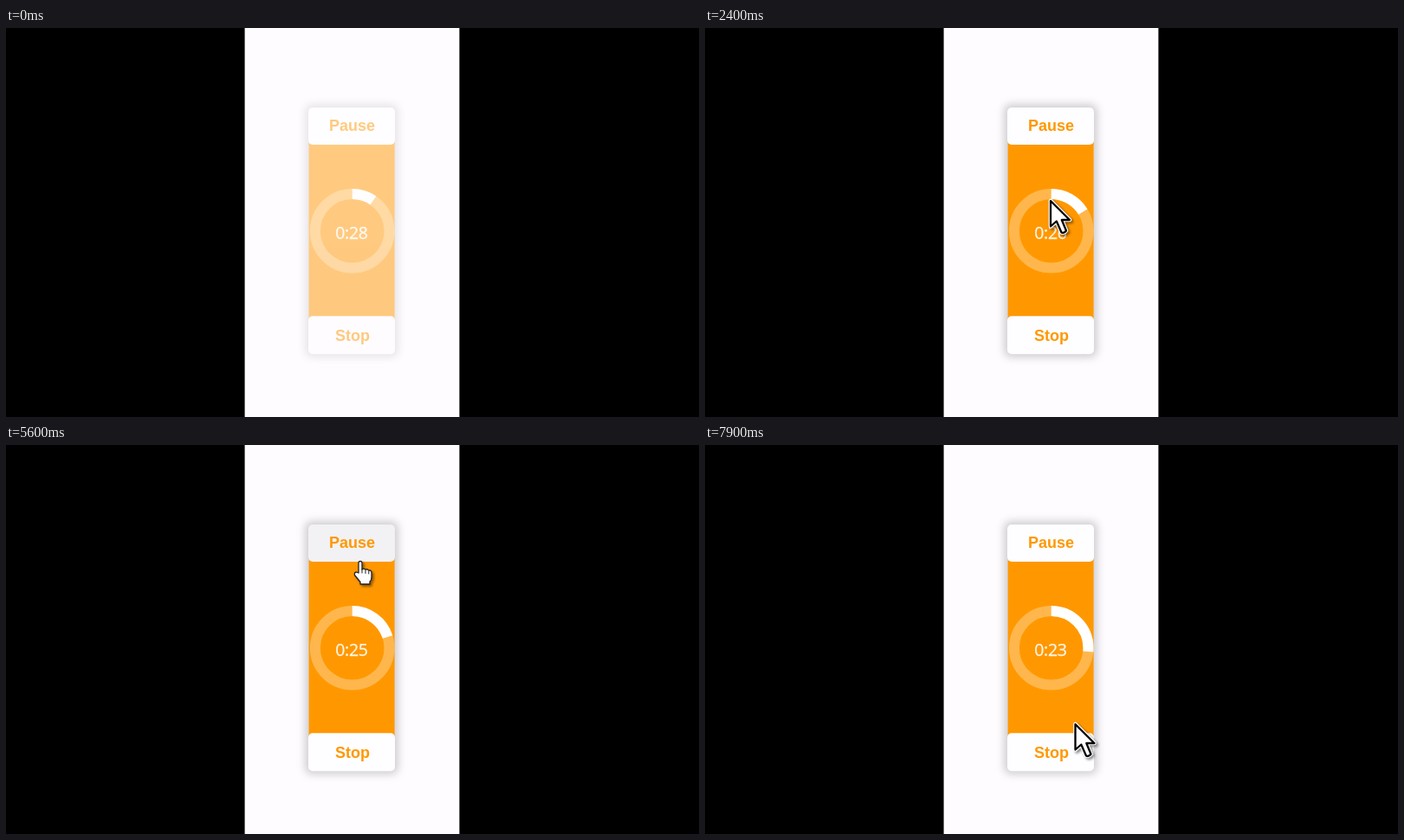
An HTML page that plays this animation: 800x450 px, repeating every 8 s.

```html
<!DOCTYPE html>
<html lang="en">
<head>
<meta charset="utf-8">
<title>Timer widget</title>
<style>
  html, body { margin: 0; width: 100%; height: 100%; overflow: hidden; background: #000; }
  svg { display: block; width: 800px; height: 450px; }
  .label { font: bold 18px "Liberation Sans", Arial, sans-serif; fill: #ff9800; text-anchor: middle; }
  .count { font: 19.5px "Open Sans", "Noto Sans", sans-serif; letter-spacing: -.3px; fill: #fff; fill-opacity: .9; stroke: #fff; stroke-width: .25; text-anchor: middle; }
  .ring { fill: none; stroke: #fff; stroke-width: 12; }
  .button { fill: #fefdff; }
  .button.hover { fill: #f2f1f4; }
  .shadow { filter: drop-shadow(2px 2px 1.5px rgba(0, 0, 0, .45)); }
</style>
</head>
<body>
<svg viewBox="0 0 800 450">
  <defs>
    <clipPath id="screen"><rect x="275.6" width="247.8" height="450"/></clipPath>
    <filter id="blur" x="-30%" y="-30%" width="160%" height="160%"><feGaussianBlur stdDeviation="5"/></filter>
    <path id="arrowShape" d="M0 0V29.5L6.8 23.5L12.5 36.5Q15.5 38 18 34.5L12.8 22H22Z"/>
  </defs>
  <rect width="800" height="450"/>
  <g clip-path="url(#screen)">
    <rect x="275" width="249" height="450" fill="#fefcff"/>
    <g id="widget">
      <rect x="345" y="88" width="108" height="293" rx="8" fill-opacity=".18" filter="url(#blur)"/>
      <rect x="349.6" y="128" width="99" height="211" fill="#ff9800"/>
      <rect id="topBtn" class="button" x="349" y="92" width="100" height="43" rx="5"/>
      <rect id="stopBtn" class="button" x="349" y="333.3" width="100" height="44" rx="5"/>
      <text id="toggle" class="label" x="399.5" y="119"></text>
      <text class="label" x="400" y="361.5">Stop</text>
      <g transform="translate(399.7 234.8) rotate(-90)">
        <circle class="ring" r="42.8" stroke-opacity=".3"/>
        <circle id="arc" class="ring" r="42.8" pathLength="360"/>
      </g>
      <text id="count" class="count" x="399" y="244"></text>
    </g>
    <g id="cursor">
      <g id="arrow" class="shadow" stroke-linejoin="round">
        <use href="#arrowShape" fill="#fff" stroke="#fff" stroke-width="4.6"/>
        <use href="#arrowShape" fill="#fff" stroke="#000" stroke-width="2.3"/>
      </g>
      <g id="hand" class="shadow" stroke="#222" stroke-linejoin="round" stroke-linecap="round">
        <path d="M-2 13V1.5Q-2 -.5 0 -.5T2 1.5V9Q3.5 7.3 6 9.2Q8 8 9.8 10.2Q13 9.3 13 13V18Q13 21.5 11 23V26H0V23.5L-6.5 15.5Q-7.3 12.5 -4.6 12Z" fill="#fff" stroke-width="1.3"/>
        <path d="M2 9V13M6 10V13.5M9.8 11V14" fill="none"/>
      </g>
    </g>
  </g>
</svg>
<script>
  const $ = id => document.getElementById(id);
  const LOOP = 8000, STEP = 100;
  const PAUSED = 3600, RESUMED = 5600, LOST = 1840;   // LOST: time the pause cost the timer
  const START_ANGLE = 34.5, SPEED = .0101;            // degrees, degrees per ms

  // key points of the pointer: [ms, x, y]
  const stops = [
    [800, 526, 322], [1500, 409.5, 277.5], [2400, 399, 200], [2700, 437, 132],
    [3000, 433, 228], [3600, 438, 135], [3900, 437, 204], [4200, 437, 204],
    [4500, 437, 140], [4750, 428, 321], [5100, 409, 135], [5600, 409, 135],
    [5950, 425, 295], [6300, 440, 166], [6900, 367, 250], [7900, 427.5, 323]
  ];

  const clamp = u => Math.min(1, Math.max(0, u));
  const smooth = u => u * u * (3 - 2 * u);

  function pointer(t) {
    const n = Math.max(1, stops.findIndex(s => s[0] >= t));
    const [t0, x0, y0] = stops[n - 1], [t1, x1, y1] = stops[n];
    const u = smooth(clamp((t - t0) / (t1 - t0)));
    return [x0 + (x1 - x0) * u, y0 + (y1 - y0) * u];
  }

  const show = (el, on) => { el.style.display = on ? "" : "none"; };

  function draw(t) {
    const [x, y] = pointer(t);
    const over = (top, bottom) => x > 349 && x < 449 && y >= top && y < bottom;
    const overTop = over(92, 135.5), overStop = over(333, 377);
    const ran = t < RESUMED ? Math.min(t, PAUSED) : t - LOST;
    const angle = START_ANGLE + SPEED * ran;

    $("widget").setAttribute("opacity", .5 + .5 * clamp((t - 1100) / 300));
    $("topBtn").classList.toggle("hover", overTop);
    $("stopBtn").classList.toggle("hover", overStop);
    $("toggle").textContent = t >= PAUSED && t < RESUMED ? "Resume" : "Pause";
    $("count").textContent = "0:" + Math.ceil(30.3 - angle / 12);
    $("arc").setAttribute("stroke-dasharray", angle + " 360");
    $("cursor").setAttribute("transform", `translate(${x} ${y})`);
    show($("cursor"), t >= 800);
    show($("hand"), overTop || overStop);
    show($("arrow"), !overTop && !overStop);
  }

  const start = performance.now();
  function tick(now) {
    const t = Math.max(0, now - start) % LOOP;
    draw(Math.floor(t / STEP) * STEP);
    requestAnimationFrame(tick);
  }
  draw(0);
  requestAnimationFrame(tick);
</script>
</body>
</html>
```
